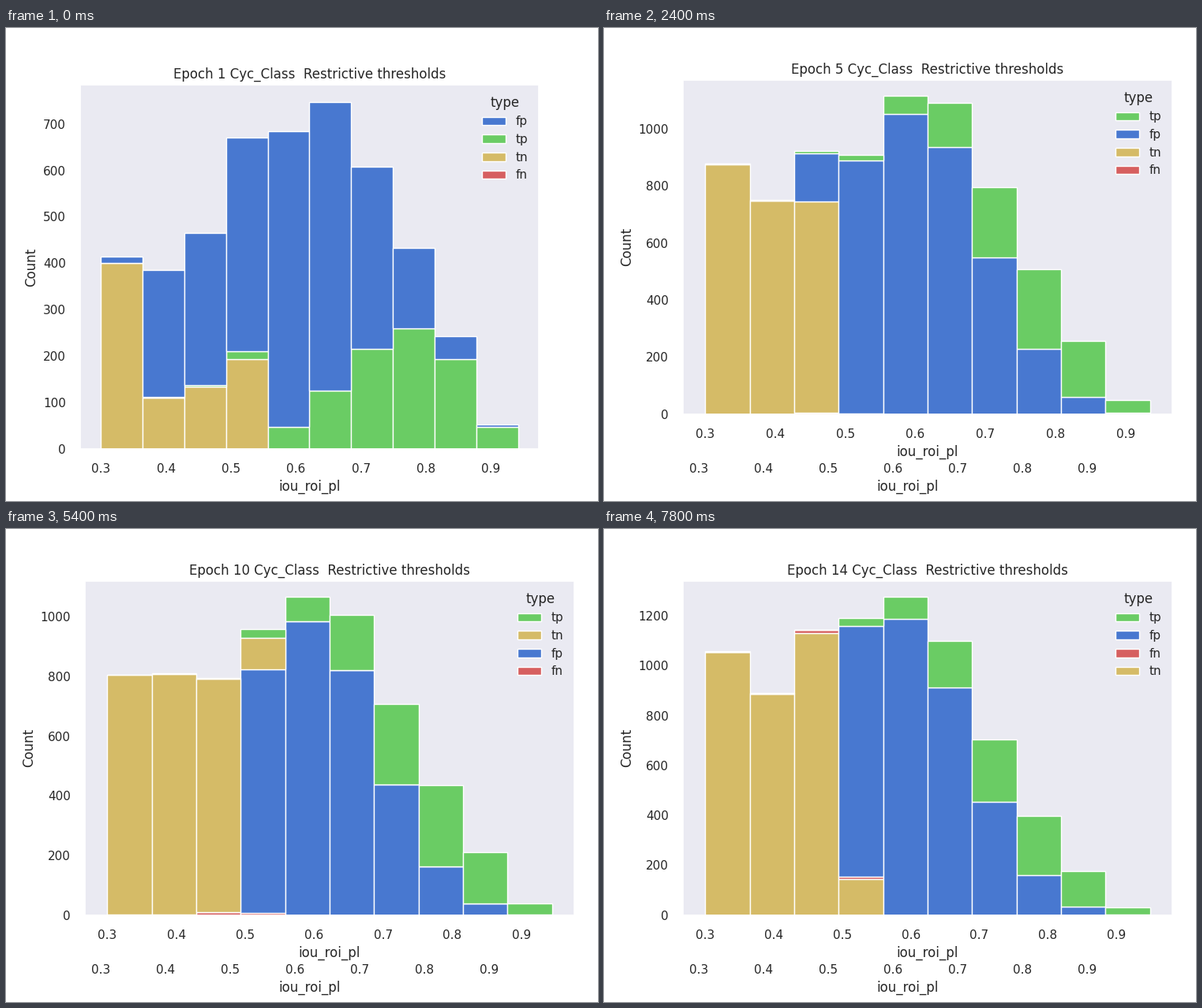
Recreate the animation shown at these times as a matplotlib script. Size 750 by 600 pixels, loop 8000 ms.

```python
import numpy as np
import matplotlib.pyplot as plt
from matplotlib.animation import FuncAnimation
from matplotlib.patches import Patch

W, H, DPI = 750, 600, 100
INK = "#262626"
BINS, START = 10, 0.3
COLORS = dict(fp="#4878d0", tp="#6acc64", tn="#d5bb67", fn="#d65f5f")

# Axes edges in pixels: left, right, top, bottom
WIDE = (93.75, 675, 72, 534)
TIGHT = (100, 719.8, 65.9, 489.75)
LAST_WIDE = 4

# Key heights of the first five bars; the later bars fall off along TAIL
KEYS = [1, 4, 5, 7, 10, 12, 14]
HEADS = [
    [415, 385, 466, 670, 685],
    [836, 828, 824, 945, 1097],
    [877, 750, 921, 908, 1115],
    [911, 841, 946, 957, 1011],
    [805, 810, 794, 958, 1066],
    [755, 896, 970, 1000, 1049],
    [1057, 891, 1145, 1191, 1276],
]
SPANS = [0.6413, 0.6444, 0.6346, 0.6430, 0.6442, 0.6668, 0.6490]
TAIL = np.array([1, 0.745, 0.487, 0.251, 0.05])

plt.rcParams.update({
    "font.family": "DejaVu Sans",
    "text.color": INK,
    "axes.labelcolor": INK,
    "axes.edgecolor": "white",
    "axes.linewidth": 1.25,
    "axes.facecolor": "#eaeaf2",
    "axes.labelsize": 12,
    "axes.titlesize": 12,
    "xtick.labelsize": 11,
    "ytick.labelsize": 11,
    "legend.fontsize": 11,
    "legend.title_fontsize": 12,
})


def track(epoch, keys, values):
    """Ease from key to key."""
    i = int(np.clip(np.searchsorted(keys, epoch, "right") - 1, 0, len(keys) - 2))
    t = np.clip((epoch - keys[i]) / (keys[i + 1] - keys[i]), 0, 1) ** 1.5
    a, b = np.array(values[i]), np.array(values[i + 1])
    return a + (b - a) * t


def histogram(epoch):
    """Counts of each type per bin."""
    k = np.arange(BINS)
    head = track(epoch, KEYS, HEADS)
    tilt = track(epoch, [1, 4, 12, 14], [-0.0866, 0.02, 0.08, 0.15])
    total = np.round(np.append(head, head[-1] * TAIL * np.exp(-tilt * (k[5:] - 4))))

    # Negatives fill the bins below a cut that climbs with training
    cut = track(epoch, [1, 4, 5, 10, 14], [0.97, 2.52, 2.81, 3.12, 3.13])
    floor = 0.29 * max(0, (LAST_WIDE - epoch) / 3) * (k < 4)
    negative = np.floor(0.998 * total * np.maximum(np.clip(cut - k, 0, 1), floor))
    fn = np.floor(epoch * np.exp(-(k - 2.3) ** 2))
    tn = np.maximum(0, negative - fn)

    # The share of true positives rises with overlap
    mid = track(epoch, [4, 5, 7, 12, 14], [6.6, 6.8, 6.6, 6.35, 6.6])
    rest = total - tn - fn
    tp = np.minimum(rest, np.floor(total / (1 + np.exp(mid - k))))
    return dict(fp=rest - tp, tp=tp, tn=tn, fn=fn)


def stack_order(epoch):
    """Types from the top of the stack to the bottom."""
    if epoch == 10:
        return ["tp", "tn", "fp", "fn"]
    if epoch == 14:
        return ["tp", "fp", "fn", "tn"]
    if epoch in (5, 6):
        return ["tp", "fp", "tn", "fn"]
    return ["fp", "tp", "tn", "fn"]


fig = plt.figure(figsize=(W / DPI, H / DPI), dpi=DPI, facecolor="white")


def add_axes(edges, span):
    left, right, top, bottom = edges
    ax = fig.add_axes([left / W, 1 - bottom / H,
                       (right - left) / W, (bottom - top) / H])
    ax.set_xlim(START - 0.05 * span, START + 1.05 * span)
    ax.set_xlabel("iou_roi_pl")
    ax.tick_params(length=0, pad=13, labelcolor=INK)
    return ax


def leave_old_labels():
    """The wide layout's x labels stay visible below the tighter one."""
    ax = add_axes(WIDE, track(LAST_WIDE, KEYS, SPANS))
    ax.patch.set_visible(False)
    ax.spines[:].set_visible(False)
    ax.set_yticks([])


def draw(i):
    epoch = 1 + i // 3
    span = track(epoch, KEYS, SPANS)
    counts, order = histogram(epoch), stack_order(epoch)
    fig.clear()
    if epoch > LAST_WIDE:
        leave_old_labels()

    ax = add_axes(WIDE if epoch <= LAST_WIDE else TIGHT, span)
    step = span / BINS
    x = START + step * np.arange(BINS)
    base = np.zeros(BINS)
    for kind in reversed(order):
        ax.bar(x, counts[kind], step, base, align="edge",
               color=COLORS[kind], edgecolor="white", linewidth=1)
        base = base + counts[kind]

    ax.set_ylim(0, 1.05 * base.max())
    ax.set_ylabel("Count")
    ax.set_title(f"Epoch {epoch} Cyc_Class  Restrictive thresholds")
    keys = [Patch(facecolor=COLORS[kind], edgecolor="white", linewidth=1, label=kind)
            for kind in order]
    ax.legend(handles=keys, title="type", loc="upper right", frameon=False)
    return []


anim = FuncAnimation(fig, draw, frames=40, interval=200,
                     repeat=True, repeat_delay=0)
plt.show()
```
